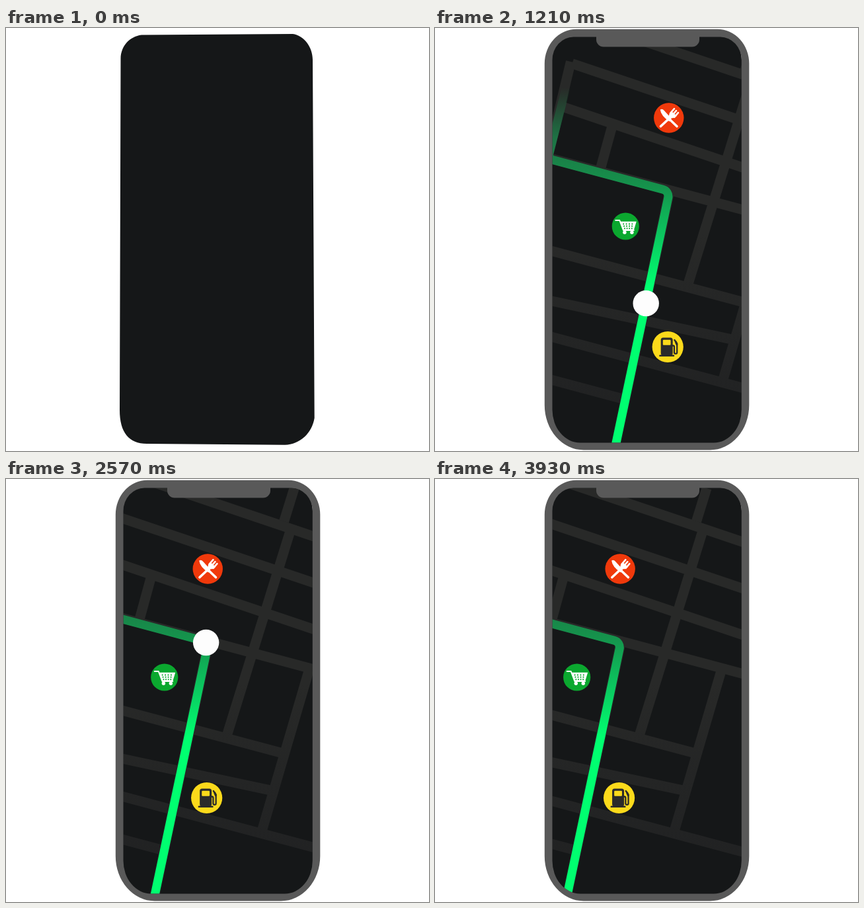
Animation of 640x640 px, one loop 4000 ms. Source, as an HTML page with a canvas:

```html
<!DOCTYPE html>
<html lang="en">
<head>
<meta charset="utf-8">
<title>Phone navigation</title>
<style>
  html, body { margin: 0; width: 100%; height: 100%; overflow: hidden; background: #fff; }
  canvas { display: block; width: 640px; height: 640px; }
</style>
</head>
<body>
<canvas id="stage"></canvas>
<script>
const LOOP = 4000, FPS = 14, PHONE_ON = 285, PAN = 122;
const INK = '#151718', SHELL = '#595959', WHITE = '#fff';
const canvas = document.getElementById('stage');
const ctx = canvas.getContext('2d');
const ratio = window.devicePixelRatio || 1;
canvas.width = canvas.height = 640 * ratio;

const verticalFade = (y0, y1, colors) => {
  const fade = ctx.createLinearGradient(0, y0, 0, y1);
  colors.forEach((color, i) => fade.addColorStop(i / (colors.length - 1), color));
  return fade;
};
const streetPaint = verticalFade(20, 600, ['#282928', '#282928', '#202122']);
const routePaint = verticalFade(90, 390,
  ['rgba(31,110,64,0)', '#1d7244', '#15934c', '#0bc75f', '#00ff70']);

// cubic-bezier(1/6, 1/6, 2/3, 1): steady start, soft stop
function ease(x) {
  let lo = 0, hi = 1;
  for (let i = 0; i < 24; i++) {
    const s = (lo + hi) / 2;
    if (0.5 * s + s * s - 0.5 * s ** 3 < x) lo = s; else hi = s;
  }
  return 0.5 * lo + 2 * lo * lo - 1.5 * lo ** 3;
}

function line(points, width, color, cap = 'butt') {
  ctx.beginPath();
  points.forEach(([x, y]) => ctx.lineTo(x, y));
  ctx.lineWidth = width;
  ctx.lineCap = cap;
  ctx.lineJoin = 'round';
  ctx.strokeStyle = color;
  ctx.stroke();
}

function shape(points, color) {
  ctx.beginPath();
  points.forEach(([x, y]) => ctx.lineTo(x, y));
  ctx.fillStyle = color;
  ctx.fill();
}

function disc(x, y, r, color) {
  ctx.beginPath();
  ctx.arc(x, y, r, 0, Math.PI * 2);
  ctx.fillStyle = color;
  ctx.fill();
}

function box(x, y, w, h, r, color) {
  ctx.beginPath();
  ctx.roundRect(x, y, w, h, r);
  ctx.fillStyle = color;
  ctx.fill();
}

function at(x, y, draw) {
  ctx.save();
  ctx.translate(x, y);
  draw();
  ctx.restore();
}

// Upright panel whose top and bottom corners have their own elliptic radii
function panelPath(left, top, right, bottom, [tx, ty], [bx, by]) {
  const h = Math.PI / 2;
  const path = new Path2D();
  path.ellipse(left + tx, top + ty, tx, ty, 0, 2 * h, 3 * h);
  path.ellipse(right - tx, top + ty, tx, ty, 0, 3 * h, 4 * h);
  path.ellipse(right - bx, bottom - by, bx, by, 0, 0, h);
  path.ellipse(left + bx, bottom - by, bx, by, 0, h, 2 * h);
  path.closePath();
  return path;
}

const screen = panelPath(177.5, 13.5, 463.8, 627.5, [32, 35], [42, 50]);
const shell = panelPath(165.8, 1.8, 475.3, 638.5, [48, 52], [59, 68]);
shell.addPath(screen);
const backing = new Path2D(
  'M205 10.5L434 9C450 11 464 28 464 48L466.7 590C463 613 445 630 422 630.7' +
  'L213 629C186 629 172 612 172 578L173.5 46C174 27 187 13 205 10.5Z');

// Cross streets lean left on the way down
const westX = y => 144 - 0.24 * y;
const eastX = y => 518 - 0.293 * y;
const midX = y => 429.3 - 0.31 * y;
const lowMidX = y => 235 - 0.274 * y;

function crossStreet(xAt, top, bottom) {
  line([[xAt(top), top], [xAt(bottom), bottom]], 15, streetPaint);
}

function drawStreets() {
  // Two blocks of four long streets, each evenly spaced
  for (let i = 0; i < 8; i++) {
    const upper = i < 4;
    const middle = upper ? 39.5 + 70.3 * i : 390 + 65 * (i - 4);
    const slope = i < 3 ? 0.337 : i === 5 ? 0.213 : 0.267;
    const yAt = x => middle + slope * (x - 300);
    const left = westX(yAt(100));
    const right = i === 4 || i === 5 ? eastX(yAt(390)) : i === 7 ? 210 : 480;
    line([[left, yAt(left)], [right, yAt(right)]], 15, streetPaint);
  }
  crossStreet(westX, 51, 340);
  crossStreet(lowMidX, 150, 213);
  crossStreet(y => midX(y) - 14, 14, 64);
  crossStreet(midX, 78, 386);
  crossStreet(eastX, 290, 532);
}

const route = { start: [199.2, 633], corner: [281.2, 247], turn: [97, 197.5], end: [128, 77] };

function drawRoute() {
  line([route.start, route.corner], 15, streetPaint);
  ctx.beginPath();
  ctx.moveTo(...route.start);
  ctx.arcTo(...route.corner, ...route.turn, 11);
  ctx.arcTo(...route.turn, ...route.end, 8);
  ctx.lineTo(...route.end);
  ctx.lineWidth = 13;
  ctx.strokeStyle = routePaint;
  ctx.stroke();
}

// Constant speed up to the corner, then a gentle pick-up along the second leg
function dotPosition(t) {
  const cornerTime = 2570, past = t - cornerTime;
  if (past > 0) {
    const gone = 75 * (past / 860) ** 1.4;
    return [277.5 - gone, 247.5 - 0.29 * gone];
  }
  const cut = 4 * Math.max(0, 1 + past / 120);
  return [282.4 + 0.0272 * past - cut, 243.8 - 0.1275 * past + cut];
}

function restaurant() {
  disc(0, 0, 22.7, '#f0390b');
  line([[-12.3, 12.8], [3, -1.5]], 3.6, WHITE, 'round');
  shape([[1, -7], [4, -10], [12, -3], [8, 0], [3, 0.5], [0, -3]], WHITE);
  for (let i = 0; i < 3; i++) {
    line([[2.4 + i * 3, -7.2 + i * 3], [8.2 + i * 3, -13.8 + i * 3]], 2.6, WHITE, 'round');
  }
  ctx.beginPath();
  ctx.moveTo(-13, -12.5);
  ctx.quadraticCurveTo(-10, -14.5, -7, -11);
  ctx.lineTo(4, 1);
  ctx.lineTo(1, 5.5);
  ctx.quadraticCurveTo(-12, -3, -13, -12.5);
  ctx.fillStyle = WHITE;
  ctx.fill();
  line([[2, 3], [12.2, 12.8]], 3.6, WHITE, 'round');
}

function shop() {
  const green = '#0ba82f';
  disc(0, 0, 20.6, green);
  line([[-15, -9], [-9, -9], [-3.3, 6], [12.5, 6]], 2, WHITE, 'round');
  shape([[-8, -7.2], [16.5, -7.2], [12.8, 5], [-4, 5]], WHITE);
  for (let row = 0; row < 3; row++) {
    for (let col = 0; col < 4; col++) {
      box(-4 + col * 4.4 + row * (0.9 - col * 0.4), -4.6 + row * 3.4, 1.8, 2, 0, green);
    }
  }
  for (const x of [-1.4, 9.6]) disc(x, 9.2, 2.7, WHITE);
}

function fuel() {
  const yellow = '#fbda1b', dark = '#2b2b2a';
  disc(0, 0, 23.6, yellow);
  box(-10.5, -14, 18, 27, 3.5, dark);
  box(-7.4, -10.8, 11.8, 8, 1.2, yellow);
  box(-13, 12, 23, 2.6, 1.2, dark);
  ctx.beginPath();
  ctx.moveTo(7, -2);
  ctx.arcTo(9.8, -2, 9.8, 8, 2);
  ctx.arc(11.9, 8.3, 2.1, Math.PI, 0, true);
  ctx.lineTo(14, -5);
  ctx.lineTo(10.2, -10.5);
  ctx.lineWidth = 2.3;
  ctx.lineCap = 'round';
  ctx.strokeStyle = dark;
  ctx.stroke();
  line([[12.2, -7.5], [13.6, -4]], 3.2, dark, 'round');
}

function drawMap(t) {
  ctx.save();
  ctx.clip(screen);
  ctx.translate(PAN * (1 - ease(Math.min(1, (t + 12) / LOOP))), 0);
  drawStreets();
  drawRoute();
  at(280.1, 136, restaurant);
  at(214.6, 300, shop);
  at(278.5, 482.5, fuel);
  disc(...dotPosition(t), 19.7, '#fdfdfd');
  ctx.restore();
}

function drawShell() {
  ctx.fillStyle = SHELL;
  ctx.fill(shell, 'evenodd');
  box(244, 8, 156, 20.5, [0, 0, 11, 11], SHELL);
}

function render(now) {
  // The picture advances in whole steps on a 10 ms clock
  const clock = Math.floor((now % LOOP) / 10) * 10;
  const t = Math.floor((clock + 9.99) * FPS / 1000) * 1000 / FPS;
  ctx.setTransform(ratio, 0, 0, ratio, 0, 0);
  ctx.fillStyle = WHITE;
  ctx.fillRect(0, 0, 640, 640);
  ctx.fillStyle = INK;
  ctx.fill(backing);
  if (t >= PHONE_ON) {
    drawMap(t);
    drawShell();
  }
}

const begin = performance.now();
function tick() {
  render(performance.now() - begin);
  requestAnimationFrame(tick);
}
tick();
</script>
</body>
</html>
```
